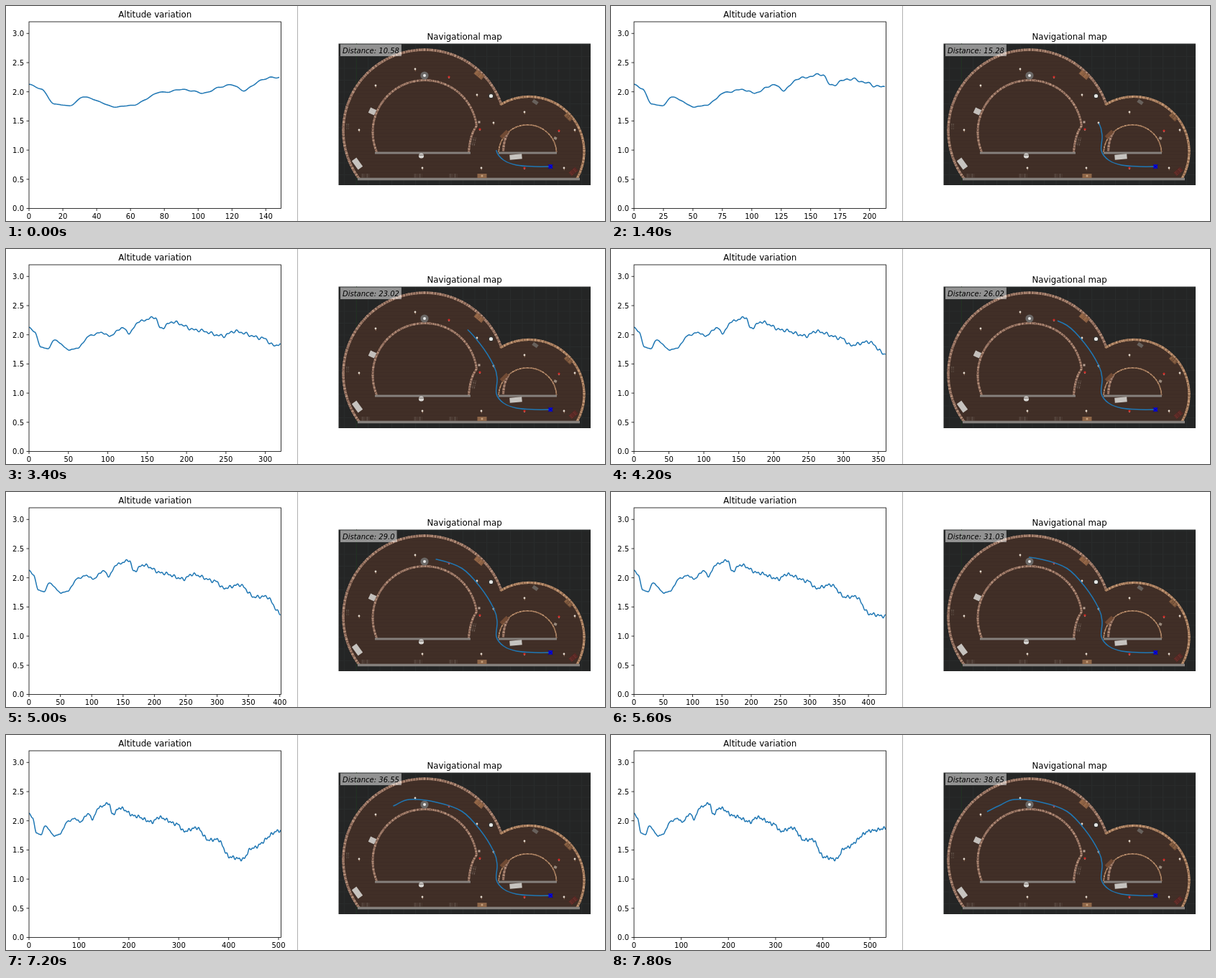
Write an HTML page that moves like this. It is 833 by 300 pixels and loops after 8000 ms.

```html
<!DOCTYPE html>
<html lang="en">
<head>
<meta charset="utf-8">
<title>Altitude and map</title>
<style>
  html, body { margin: 0; width: 100%; height: 100%; overflow: hidden; background: #fff; }
  svg { display: block; width: 100%; height: 100%; }
  text { font: 10px "DejaVu Sans", sans-serif; fill: #000; }
  .title { font-size: 11.8px; text-anchor: middle; }
  .x { text-anchor: middle; }
  .y { text-anchor: end; }
  .axis { fill: none; stroke: #000; stroke-width: .8; }
  .line { fill: none; stroke: #1f77b4; stroke-width: 1.5; stroke-linejoin: round; }
  #label { font-style: italic; }
  #walls { fill: none; }
</style>
</head>
<body>
<svg viewBox="0 0 833 300">
  <defs>
    <pattern id="grid" x="8" y="4" width="16.5" height="16.5" patternUnits="userSpaceOnUse">
      <rect width="17" height="17" fill="#242525"/>
      <path d="M0 .5H17M.5 0V17" stroke="#292b2b"/>
    </pattern>
    <pattern id="planks" width="46" height="10" patternUnits="userSpaceOnUse">
      <rect width="46" height="10" fill="#412f27"/>
      <path d="M0 2.5H46M0 7.5H46" stroke="#3e2c25"/>
    </pattern>
    <clipPath id="plot"><rect x="32" y="22" width="350.5" height="260.5"/></clipPath>
    <clipPath id="frame"><rect x="462.5" y="52.5" width="350.5" height="197.5"/></clipPath>
  </defs>

  <path d="M405.5 0V300" stroke="#b0b0b0"/>
  <text class="title" x="207.3" y="16">Altitude variation</text>
  <g id="yTicks"></g>
  <g id="xTicks"></g>
  <polyline id="curve" class="line" clip-path="url(#plot)"/>
  <rect class="axis" x="32" y="22" width="350.5" height="260.5"/>

  <text class="title" x="637.6" y="47">Navigational map</text>
  <g clip-path="url(#frame)">
    <rect x="462" y="52" width="352" height="199" fill="url(#grid)"/>
    <path d="M487.5 52V250" stroke="#213021"/>
    <path id="floor" fill="url(#planks)"/>
    <g id="walls"></g>
    <g fill="none" stroke="#85807c">
      <path d="M489 241.5H798" stroke-width="3.6"/>
      <path d="M513 205H646M685 205H766" stroke-width="3"/>
    </g>
    <g id="objects"></g>
    <path id="track" class="line"/>
    <rect x="754.5" y="221.3" width="5.4" height="5.4" fill="#0000f0"/>
    <path d="M753.5 221L761 227.5M761 221L753.5 227.5" stroke="#10107a" stroke-width=".8"/>
    <rect id="box" x="465" y="53.5" width="85" height="16.5" fill="#fff" fill-opacity=".5"/>
    <text id="label" x="468" y="65.5"></text>
  </g>
</svg>
<script>
const STEP = 200, LOOP = 8000;
const LEFT = 32, BOTTOM = 282.5, WIDTH = 350.5, UNIT = 81.4;

// [time, distance flown]
const FLIGHT = [[0, 10.58], [1400, 15.28], [2600, 20.01], [4200, 26.02], [5000, 29], [6400, 33.74], [7800, 38.65]];

// [sample, altitude] at the main turns of the curve
const TURNS = [
  [0, 2.13], [7, 2.05], [15, 1.79], [24, 1.76], [32, 1.91], [52, 1.74], [61, 1.77], [78, 1.99],
  [92, 2.04], [102, 1.98], [119, 2.12], [127, 2.03], [140, 2.23], [160, 2.3], [167, 2.11], [182, 2.22],
  [213, 2.08], [247, 1.98], [260, 2.06], [298, 1.94], [310, 1.82], [336, 1.88], [360, 1.67],
  [378, 1.68], [402, 1.38], [428, 1.34], [446, 1.53], [502, 1.83], [540, 1.88]
];

const TRACK = [
  [759, 224], [735, 224], [710, 222], [692, 215], [682, 202], [683, 181], [678.5, 163],
  [659, 132], [634, 106.5], [599, 94], [561, 90], [541, 98], [523, 107]
];

const $ = id => document.getElementById(id);
const linear = u => u;
const smooth = u => u * u * (3 - 2 * u);

function add(parent, tag, attrs, text) {
  const el = document.createElementNS("http://www.w3.org/2000/svg", tag);
  for (const name in attrs) el.setAttribute(name, attrs[name]);
  if (text !== undefined) el.textContent = text;
  parent.appendChild(el);
}

function interpolate(keys, at, ease) {
  const i = Math.max(1, keys.findIndex(key => key[0] >= at));
  const [[x0, y0], [x1, y1]] = [keys[i - 1], keys[i]];
  return y0 + (y1 - y0) * ease((at - x0) / (x1 - x0));
}

function altitudeAt(sample) {
  const ripple = .03 * Math.sin(sample * .78) * Math.sin(sample * .21);
  return interpolate(TURNS, sample, smooth) + ripple * Math.min(1, sample / 200);
}

function smoothPath(points) {
  const at = i => points[Math.max(0, Math.min(points.length - 1, i))];
  let d = "M" + points[0];
  for (let i = 0; i < points.length - 1; i++) {
    const [a, b, c, e] = [at(i - 1), at(i), at(i + 1), at(i + 2)];
    const c1 = b.map((v, j) => v + (c[j] - a[j]) / 6);
    const c2 = c.map((v, j) => v - (e[j] - b[j]) / 6);
    d += `C${c1} ${c2} ${c}`;
  }
  return d;
}

// clockwise arc around a centre, angles in degrees
function arc(cx, cy, r, from, to) {
  const point = deg => [cx + r * Math.cos(deg * Math.PI / 180), cy + r * Math.sin(deg * Math.PI / 180)];
  return `${point(from)}A${r} ${r} 0 ${to - from > 180 ? 1 : 0} 1 ${point(to)}`;
}

function drawWall(d, width, [base, light, dark]) {
  const layers = [[base, "none"], [light, "1.3 2.1 .7 1.6 2.2 3.1"], [dark, ".8 3.7 1.2 2.9 .6 5.3"]];
  for (const [stroke, dash] of layers)
    add($("walls"), "path", { d, stroke, "stroke-width": width, "stroke-dasharray": dash });
}

function drawWalls() {
  const stone = ["#94705f", "#b8937d", "#62473c"];
  const brick = ["#aa7f5f", "#c49a78", "#75543d"];
  const bigArc = arc(582, 174, 113, 143.6, 339.5);
  const smallArc = arc(727.5, 203, 76.5, 239.5, 390);
  $("floor").setAttribute("d", `M${bigArc}L${smallArc}Z`);
  drawWall("M" + bigArc + "L687.5 136", 3.4, stone);
  drawWall("M687.5 136L" + smallArc, 3.2, brick);
  drawWall("M" + arc(582.5, 176, 72.5, 157, 353) + "Q645 180 643.5 204", 2.8, stone);
  drawWall("M" + arc(725.3, 206, 40.3, 183, 357), 1.5, brick);
  drawWall("M691.5 203Q692 186 699 176", 3, stone);
}

function drawBox(x, y, w, h, angle, fill) {
  add($("objects"), "rect", {
    x: x - w / 2, y: y - h / 2, width: w, height: h, fill, transform: `rotate(${angle} ${x} ${y})`
  });
}

function drawDot(cx, cy, r, fill) {
  add($("objects"), "circle", { cx, cy, r, fill });
}

function drawShelf(x, y, w, h, angle, stroke) {
  add($("objects"), "path", {
    d: `M${-w / 2} ${-h / 2}h${w}M${-w / 2} 0h${w}M${-w / 2} ${h / 2}h${w}`,
    fill: "none", stroke, "stroke-dasharray": "3 1 1 1.5", transform: `translate(${x} ${y}) rotate(${angle})`
  });
}

function drawObjects() {
  // furniture
  drawBox(658, 96, 14, 7, 40, "#80583e");
  drawShelf(658, 96, 12, 4, 40, "#a87650");
  drawBox(782, 155, 12, 6, 45, "#6c4a34");
  drawShelf(782, 155, 11, 3, 45, "#966c4b");
  drawBox(693, 179, 13, 5, -45, "#704a34");
  drawBox(662, 237, 13, 6, 0, "#8d6547");
  drawDot(662, 237, 1.5, "#c9a17c");
  drawBox(736, 134, 8, 5, 35, "#68615c");
  drawBox(789, 231, 12, 7, -42, "#532622");
  drawShelf(789, 231, 11, 4, -42, "#713630");
  for (const x of [500, 573, 622]) drawShelf(x, 237, 11, 4, 0, "#65574f");
  drawShelf(650, 188, 13, 5, -78, "#6e5e55");
  drawShelf(475, 168, 8, 3, 90, "#57483f");

  // pale tables and lamps
  drawBox(509.5, 147, 9, 8, 25, "#c3bfbb");
  drawBox(488.5, 220, 8, 15, -36, "#c6c3bf");
  drawBox(709, 210.5, 17, 7, -5, "#c6c3bf");
  drawDot(577.5, 209, 3.6, "#d8d6d3");
  drawBox(577.5, 208, 7, 1, 0, "#6a625c");
  drawDot(582, 97, 5.6, "#6b6866");
  drawDot(582, 97, 2, "#e8e8e8");
  drawDot(674.5, 125.5, 4, "#36312e");
  drawDot(674.5, 125.5, 2.6, "#e4e6e4");
  drawBox(764, 184.5, 4, 3.5, 25, "#9b8b7e");
  drawBox(658, 162, 3, 3, 0, "#b9a294");

  const cones = [[569, 88], [514, 111], [491, 173], [579, 226], [661, 226],
    [655, 124], [678, 163], [721, 148], [776, 226], [791, 173]];
  for (const [x, y] of cones) {
    drawDot(x, y, 1.4, "#e3d8cc");
    drawBox(x + .3, y + 2, 1, 2, 0, "#94745f");
  }
  for (const [x, y] of [[616, 99], [659, 172], [769, 174], [721, 226]]) {
    drawDot(x, y, 1.6, "#d22c28");
    drawBox(x, y + 1.6, 1, 1, 0, "#e0b4a8");
  }
}

function drawYTicks() {
  for (let v = 0; v <= 3; v += .5) {
    const y = BOTTOM - v * UNIT;
    add($("yTicks"), "path", { class: "axis", d: `M${LEFT} ${y}h-3.5` });
    add($("yTicks"), "text", { class: "y", x: 25, y: y + 3.8 }, v.toFixed(1));
  }
}

function drawXTicks(range) {
  const step = [20, 25, 50, 100].find(s => range / s <= 9);
  $("xTicks").replaceChildren();
  for (let v = 0; v <= range; v += step) {
    const x = LEFT + v / range * WIDTH;
    add($("xTicks"), "path", { class: "axis", d: `M${x} ${BOTTOM}v3.5` });
    add($("xTicks"), "text", { class: "x", x, y: 297 }, v);
  }
}

// two decimals without a trailing zero, but at least one
function formatDistance(distance) {
  return distance.toFixed(2).replace(/0$/, "");
}

function render(time) {
  const distance = interpolate(FLIGHT, time, linear);
  const count = Math.round(4.5 + 13.7 * distance);
  drawXTicks(count);
  const points = Array.from({ length: count }, (_, i) =>
    `${(LEFT + i / count * WIDTH).toFixed(2)},${(BOTTOM - altitudeAt(i) * UNIT).toFixed(2)}`);
  $("curve").setAttribute("points", points.join(" "));
  $("track").setAttribute("stroke-dasharray", `${distance} 100`);
  $("label").textContent = "Distance: " + formatDistance(distance);
  $("box").setAttribute("width", $("label").getComputedTextLength() + 6);
}

drawYTicks();
drawWalls();
drawObjects();
$("track").setAttribute("d", smoothPath(TRACK));
$("track").setAttribute("pathLength", FLIGHT[FLIGHT.length - 1][1]);

const start = performance.now();
let shown = -1;
function tick() {
  const time = Math.floor((performance.now() - start) % LOOP / STEP) * STEP;
  if (time !== shown) render(shown = time);
  requestAnimationFrame(tick);
}
tick();
</script>
</body>
</html>
```
